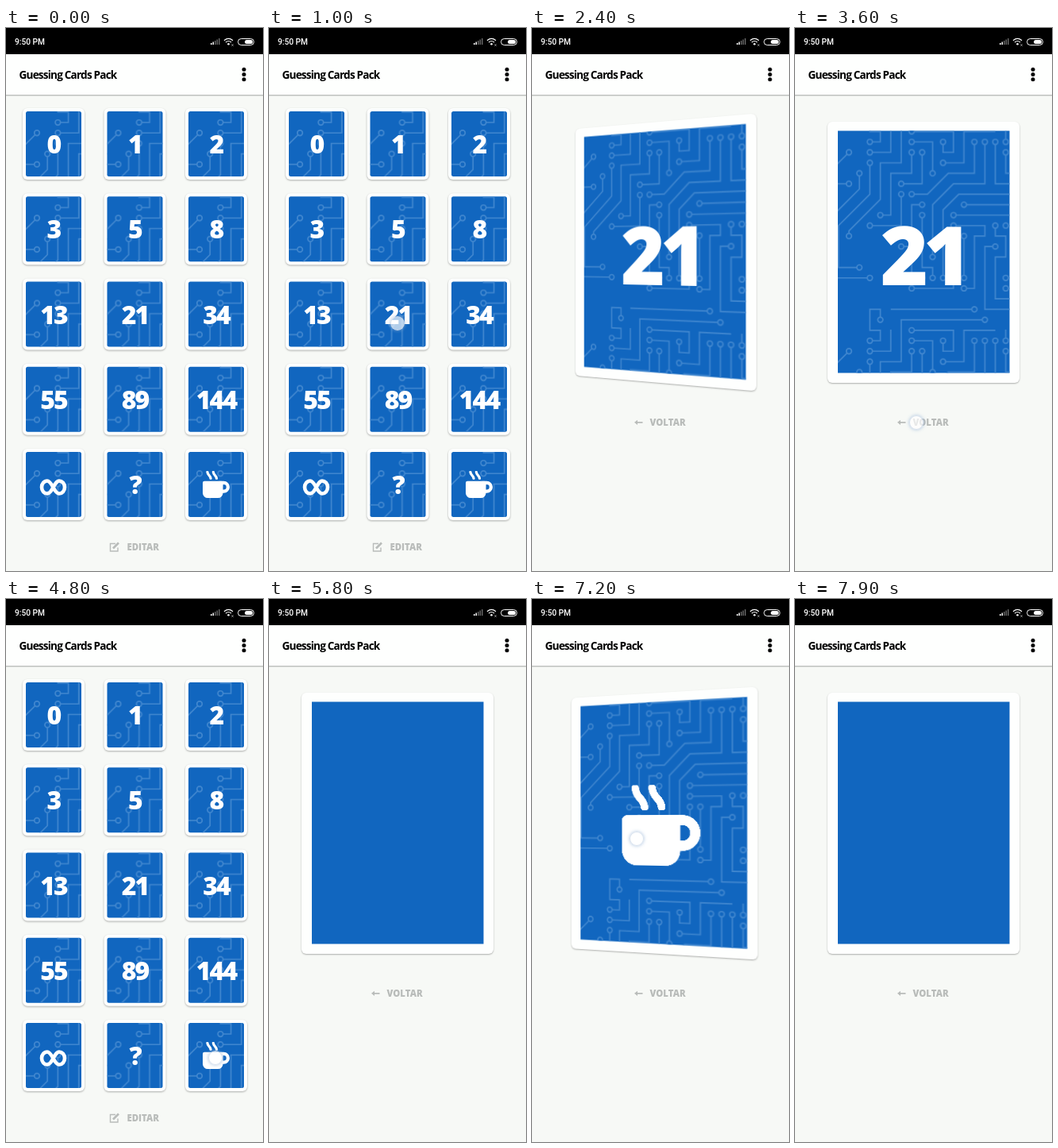
Recreate the animation shown at these times as an HTML page. Size 324x684 px, loop 8000 ms.

```html
<!DOCTYPE html>
<html lang="pt">
<head>
<meta charset="utf-8">
<title>Guessing Cards Pack</title>
<style>
  html, body { margin: 0; width: 100%; height: 100%; overflow: hidden; background: #f7f9f6; }
  svg { display: block; position: absolute; left: 0; top: 0; }
  text { font-family: "Open Sans", sans-serif; font-weight: 800; }
  .value { fill: #fff; text-anchor: middle; letter-spacing: -.06em; }
  .link { fill: #b9bcba; font-size: 11.4px; }
  .trace { fill: none; stroke: #4187cf; stroke-width: .125; marker-start: url(#pad); }
  .double { marker-end: url(#pad); }
  .face {
    position: absolute; left: 41px; top: 118px; width: 242px; height: 329px;
    border-radius: 6px; background: #fefffe; box-shadow: 0 1px 2px rgba(0,0,0,.3);
  }
  .paper { fill: #fefffe; filter: drop-shadow(0 1px 1px rgba(0,0,0,.3)); }
  #touch {
    position: absolute; left: -9px; top: -9px; width: 16px; height: 16px; border-radius: 50%;
    background: rgba(255,255,255,.68); border: 1px solid rgba(205,217,232,.75);
    box-shadow: 0 0 4px rgba(150,180,215,.8);
  }
</style>
</head>
<body>
<svg width="324" height="684">
  <defs>
    <marker id="pad" markerUnits="userSpaceOnUse" markerWidth="1" markerHeight="1" refX=".5" refY=".5">
      <circle cx=".5" cy=".5" r=".25" fill="#1166bf" stroke="#4187cf" stroke-width=".125"/>
    </marker>
    <pattern id="board" width="19" height="19" patternUnits="userSpaceOnUse" patternTransform="scale(13.18)">
      <g id="traces" transform="translate(.0625 .0625)"></g>
    </pattern>
    <symbol id="mug" viewBox="0 0 512 512">
      <path fill="#fff" fill-rule="evenodd" d="M32 192H400a112 112 0 0 1 0 224H384a96 96 0 0 1-96 96H96a96 96 0 0 1-96-96V224a32 32 0 0 1 32-32ZM384 256v96h16a48 48 0 0 0 0-96Z"/>
      <g id="steam" fill="#fff">
        <path d="M80 0H97Q110 0 113 14C117 40 126 54 139 67Q171 100 176 142Q176 160 160 160H143Q129 160 127 146C124 126 117 115 105 102Q69 65 64 18Q64 0 80 0Z"/>
      </g>
      <use href="#steam" x="112"/>
    </symbol>
  </defs>

  <rect width="324" height="33"/>
  <text x="11" y="21" fill="#fff" style="font:500 10.2px Roboto,sans-serif">9:50 PM</text>
  <g fill="#fff">
    <path d="M258 19h1.5v2h-1.5zM260.5 17.5h1.5v3.5h-1.5z"/>
    <path opacity=".4" d="M263 16h1.5v5h-1.5zM265.5 14.5h1.5v6.5h-1.5zM268 13h1.5v8h-1.5z"/>
    <circle cx="280.5" cy="20.3" r="1.3"/>
    <path fill="none" stroke="#fff" stroke-width="1.2" d="M275 15.700q5.500-4.500 11 0M277 18q3.500-3 7 0"/>
    <path fill="none" stroke="#fff" stroke-width=".7" d="M284.500 20.500l2 2m0-2l-2 2"/>
    <rect x="292.5" y="13.5" width="20" height="8" rx="4" fill="none" stroke="#fff"/>
    <rect x="301" y="15" width="10" height="5" rx="2.5"/>
  </g>

  <rect y="84" width="324" height="1.5" fill="#bfc1c0"/>
  <rect y="33" width="324" height="51" fill="#fefffe"/>
  <text x="16.5" y="63.5" style="font-weight:700;font-size:13.6px;letter-spacing:-.06em">Guessing Cards Pack</text>
  <circle cx="300" cy="52.2" r="2.5"/><circle cx="300" cy="58.5" r="2.5"/><circle cx="300" cy="64.8" r="2.5"/>

  <g id="deck">
    <g fill="none" stroke="#b9bcba" stroke-width="1.4">
      <path d="M138 649.5h-6.5v9.5h9.5v-4.5"/>
      <path stroke-width="2.6" d="M135 655.5l7-7"/>
    </g>
    <text class="link" x="152.5" y="657.5">EDITAR</text>
  </g>
  <g id="back-link">
    <path fill="#b9bcba" d="M129 496.8l4-3v2.200h6.500v1.700h-6.500v2.200z"/>
    <text class="link" x="148.5" y="500.8">VOLTAR</text>
  </g>
</svg>

<div id="single">
  <div class="face" id="back">
    <svg width="242" height="329"><rect x="13" y="11.5" width="216.5" height="305" fill="#1166bf"/></svg>
  </div>
  <div class="face" id="front">
    <svg width="242" height="329">
      <g transform="translate(13 11.5)">
        <rect width="216.5" height="305" fill="#1166bf"/>
        <rect width="216.5" height="305" fill="url(#board)"/>
      </g>
      <g id="number"><text class="value" x="121" y="206" font-size="103">21</text></g>
      <g id="coffee"><use href="#mug" x="70" y="116" width="102" height="102"/></g>
    </svg>
  </div>
</div>
<div id="touch"></div>

<script>
const LOOP = 8000, FRAME = 100;
const $ = id => document.getElementById(id);

function add(parent, tag, attrs, text) {
  const el = document.createElementNS('http://www.w3.org/2000/svg', tag);
  for (const key in attrs) el.setAttribute(key, attrs[key]);
  if (text) el.textContent = text;
  parent.append(el);
  return el;
}

// Circuit traces on a 19 x 19 grid: each starts at a round pad.
const openTraces = `M3 14H-1|M13 17H5|M16 14H19|M16 15H19|M1 5H-1|M16 1V-1|M15 1V5H19|M16 2V4H19|M1 2l-2 2
  |M4 18V17H3V19|M15 11H14V17H19|M3 2H5V-1|M14 18H6V19|M15 9V10H16V12H15V16H19|M3 1H4V0H3V-1
  |M10 3H12V0H15|M10 14V7.5l1.5 -1.5H19|M1 10V9.5l3 -3V3H6V-1|M2 4V5.5l-3 3|M7 19H11`;
const closedTraces = `M17 8H11|M12 7H18|M12 14V10|M8 8V13H9V14|M8 7H7V10H5|M7 15H11V10|M6 11H7V14H8
  |M16 9H17V12|M12 15H13V10H14V9H11|M6 6V9H3|M7 2V4H5V8H4|M6 5H8V2|M7 1H9V4|M7 0H11V2H10V1
  |M7 6H8.5l2 -2H13V1|M9 12V7l2 -2H14V1|M3 3V6l-3 3V13H2`;
const drawTraces = (list, kind) =>
  list.split('|').forEach(d => add($('traces'), 'path', { d: d.trim(), class: kind }));
drawTraces(openTraces, 'trace');
drawTraces(closedTraces, 'trace double');

const INFINITY = 'M0 0C-4-7-6-8-7.5-8a7 8 0 0 0 0 16C-5 8-3 6 0 0S6-8 7.5-8a7 8 0 0 1 0 16C5 8 3 6 0 0Z';
['0', '1', '2', '3', '5', '8', '13', '21', '34', '55', '89', '144', '∞', '?', 'mug'].forEach((value, i) => {
  const x = 25 + i % 3 * 102.5, y = 105 + Math.floor(i / 3) * 107.25;
  const card = add($('deck'), 'g', { transform: `translate(${x} ${y})` });
  add(card, 'rect', { class: 'paper', x: -4, y: -4, width: 78, height: 90, rx: 6 });
  for (const fill of ['#1166bf', 'url(#board)'])
    add(card, 'rect', { width: 70, height: 82, rx: 2.5, fill });
  if (value === 'mug')
    add(card, 'use', { href: '#mug', x: 18, y: 24, width: 34, height: 34 });
  else if (value === '∞')
    add(card, 'path', { d: INFINITY, transform: 'translate(34.5 44.5)', fill: 'none', stroke: '#fff', 'stroke-width': 4.6 });
  else
    add(card, 'text', { class: 'value', x: 35, y: 53, 'font-size': 32 }, value);
});

const tracks = [];
function track(el, prop, steps) {
  const keys = steps.map(([time, value, easing = 'step-end']) => ({ offset: time / LOOP, [prop]: value, easing }));
  keys.push({ offset: 1, [prop]: steps[steps.length - 1][1] });
  const anim = el.animate(keys, { duration: LOOP, iterations: Infinity });
  anim.pause();
  tracks.push(anim);
}

// Shows or hides an element by turns, switching at each given time.
const toggle = (el, first, times) =>
  track(el, 'opacity', [0, ...times].map((time, i) => [time, (first + i) % 2]));

const cuts = [1100, 3700, 5000], reset = 4200;
toggle($('deck'), 1, cuts);
toggle($('back-link'), 0, cuts);
toggle($('single'), 0, cuts);
toggle($('number'), 1, [reset]);
toggle($('coffee'), 0, [reset]);

const TURN = 600, EDGE_ON = 177; // the eased half turn passes 90 degrees at EDGE_ON
const [reveal, revealAgain, hide] = [2037, 6246, 7146];
const turns = [[0, -180], [reveal, -180, 'ease'], [reveal + TURN, 0], [reset, -180],
  [revealAgain, -180, 'ease'], [revealAgain + TURN, 0], [hide, 0, 'ease'], [hide + TURN, -180]];
const swaps = [reveal + EDGE_ON, reset, revealAgain + EDGE_ON, hide + EDGE_ON];
function spin(el, shift, shown) {
  track(el, 'transform', turns.map(([time, angle, easing]) =>
    [time, `perspective(700px) rotateY(${angle + shift}deg)`, easing]));
  toggle(el, shown, swaps);
}
spin($('front'), 0, 0);
spin($('back'), 180, 1);

const taps = [[1000, 162, 372], [2000, 130, 296], [3600, 153, 497], [4800, 264, 578], [6200, 130, 300], [7100, 132, 302]];
toggle($('touch'), 0, taps.flatMap(([time]) => [time, time + 200]));
track($('touch'), 'transform', [[0, 'translate(0px, 0px)'],
  ...taps.map(([time, x, y]) => [time, `translate(${x}px, ${y}px)`])]);

function render() {
  const time = Math.floor((performance.now() + 8) / FRAME) * FRAME % LOOP;
  tracks.forEach(anim => { anim.currentTime = time; });
  requestAnimationFrame(render);
}
render();
</script>
</body>
</html>
```
